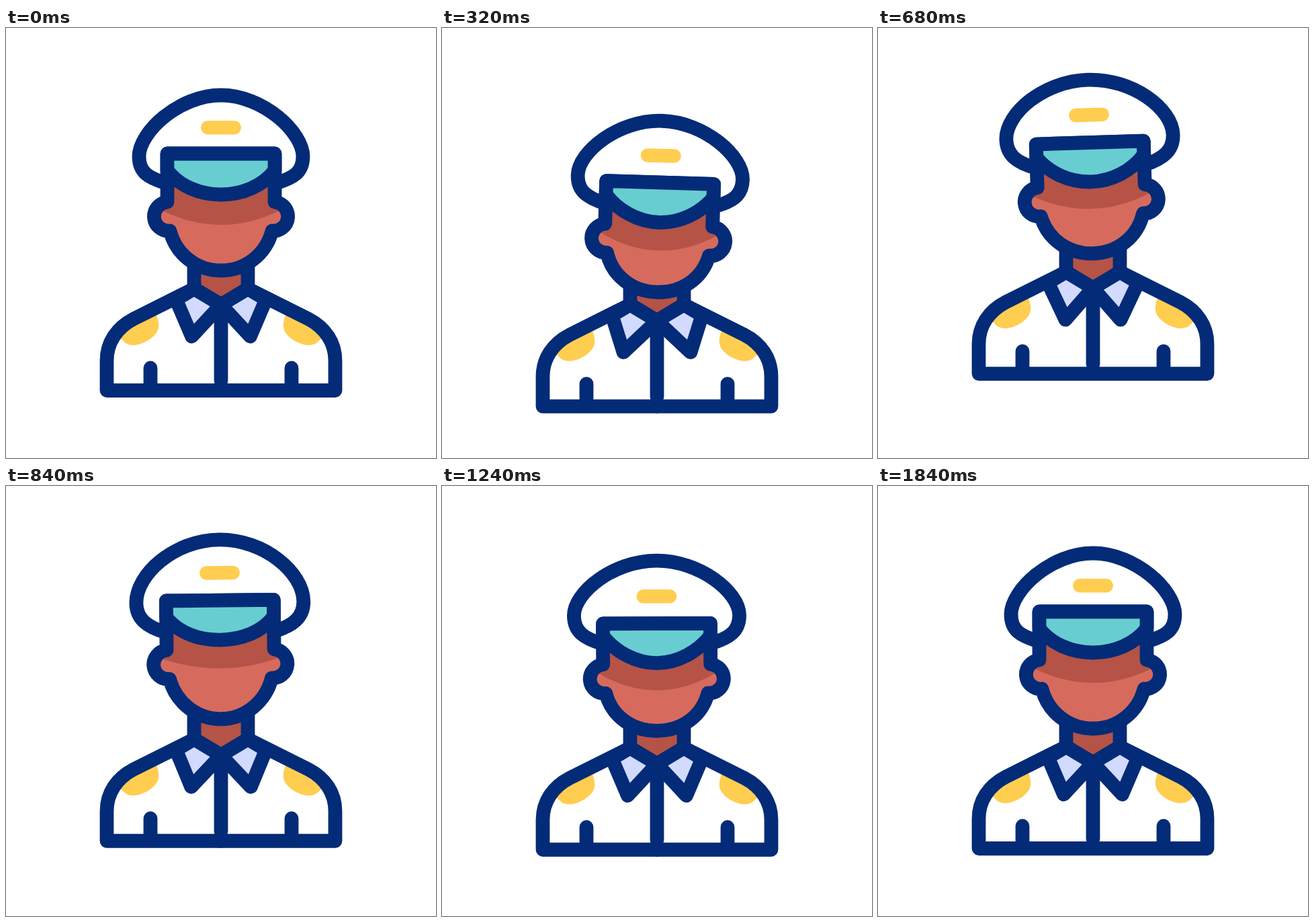
Write an HTML page that moves like this. It is 640x640 px and loops after 2.12 s.

```html
<!DOCTYPE html>
<html lang="en">
<head>
<meta charset="utf-8">
<title>Captain</title>
<style>
  html, body { margin: 0; height: 100%; overflow: hidden; background: #fff; }
  svg { display: block; width: 100%; height: 100%; }
  .line { stroke: #042b77; stroke-width: 20.8; stroke-linecap: round; stroke-linejoin: round; }
</style>
</head>
<body>
<svg id="stage" viewBox="0 0 640 640"></svg>
<script>
const LOOP = 2120, REST = 1840, STEP = 40;
const stage = document.getElementById('stage');

// Swings from rest through the given [time, value] turning points and back to rest
function swing(t, ...turns) {
  const points = [[0, 0], ...turns, [REST, 0]];
  const i = points.findIndex(p => p[0] > t);
  if (i < 0) return 0;
  const [t0, a] = points[i - 1], [t1, b] = points[i];
  return a + (b - a) * (1 - Math.cos(Math.PI * (t - t0) / (t1 - t0))) / 2;
}

const shape = (d, fill = 'none', line = true) =>
  `<path d="${d}" fill="${fill}"${line ? ' class="line"' : ''}/>`;

function bodySvg(y, spread) {
  const half = shape('M223 425Q232 445 222 456C212 468 190 477 178 469L167 459Z', '#ffcd50', false)
    + shape('M280 388L190 433C165 446 150 468 150 495V539.5H320M215 506V530')
    + shape(`M280 388L320 412L${276.5 - spread} 459L253 404Z`, '#d2dbff');
  return `<g transform="translate(0 ${y})">
    ${shape('M280 335V388L320 412L360 388V335Z', '#b55347')}
    ${half}<g transform="matrix(-1 0 0 1 640 0)">${half}</g>
    ${shape('M320 412V525')}</g>`;
}

// The head is drawn at its own height; nod slides the features down, puff swells the cap
function headSvg(y, nod, puff, tilt) {
  const top = 100 + .7 * nod - puff, side = 191 - 1.5 * puff, hem = 231;
  const left = 198 - puff, right = 442 + puff;
  const bend = side - (.39 + .03 * puff) * (side - top), crown = 63 + 1.5 * puff;
  const cap = `M238 ${hem}C212 ${hem - 8} ${left} ${side + 24} ${left} ${side}
    C${left} ${bend} ${320 - crown} ${top} 320 ${top}
    S${right} ${bend} ${right} ${side}C${right} ${side + 24} 428 ${hem - 8} 402 ${hem}`;

  const band = 187 + 1.05 * nod + puff, ear = .25 * nod, lobe = 259 + ear, jaw = 302 + ear;
  const face = `M240 ${band}V${lobe}A21 21 0 0 0 244 ${jaw}
    C253 ${jaw + 35} 284 361 320 361S387 ${jaw + 35} 396 ${jaw}
    A21 21 0 0 0 400 ${lobe}V${band}Z`;

  const rim = lobe + 12, shade = 293 + .75 * nod - 1.5 * puff;
  const dark = `M245 ${band}V${lobe + 3}L231 ${rim}Q320 ${2 * shade - rim} 409 ${rim}
    L395 ${lobe + 3}V${band}Z`;

  const edge = 212 + .6 * nod, dip = 248 + .97 * nod;
  const visor = `M240 ${band}V${edge}C258 ${edge + 23} 288 ${dip} 320 ${dip}
    S382 ${edge + 23} 400 ${edge}V${band}Z`;

  return `<g transform="translate(0 ${y}) rotate(${tilt} 320 354)">
    ${shape(cap, '#fff')}
    <rect x="290" y="${138 + nod}" width="60" height="20.5" rx="10.25" fill="#ffcd50"/>
    ${shape(face, '#d66b5d', false)}${shape(dark, '#b55347', false)}${shape(face)}
    ${shape(visor, '#68cdd1')}</g>`;
}

function draw(now) {
  const t = Math.floor((now % LOOP) / STEP) * STEP;
  const body = swing(t, [300, 24], [720, -26], [1000, 12], [1320, 0]);
  const lift = swing(t, [320, 8.5], [840, -3], [1200, 2], [1440, -4.5]);
  const nod = swing(t, [560, 15.5], [820, -5], [1180, 15.5], [1440, -7]);
  const puff = swing(t, [900, 2.5], [1180, .8], [1460, 3.5]);
  const tilt = swing(t, [340, 1.7], [700, -1.75], [1000, .9], [1400, -.75]);
  const spread = swing(t, [300, 6.5], [700, -2.5], [1000, 5], [1360, -1.5]);
  stage.innerHTML = bodySvg(body, spread) + headSvg(body + lift, nod, puff, tilt);
}

const start = performance.now();
function tick() {
  draw(performance.now() - start);
  requestAnimationFrame(tick);
}
tick();
</script>
</body>
</html>
```
